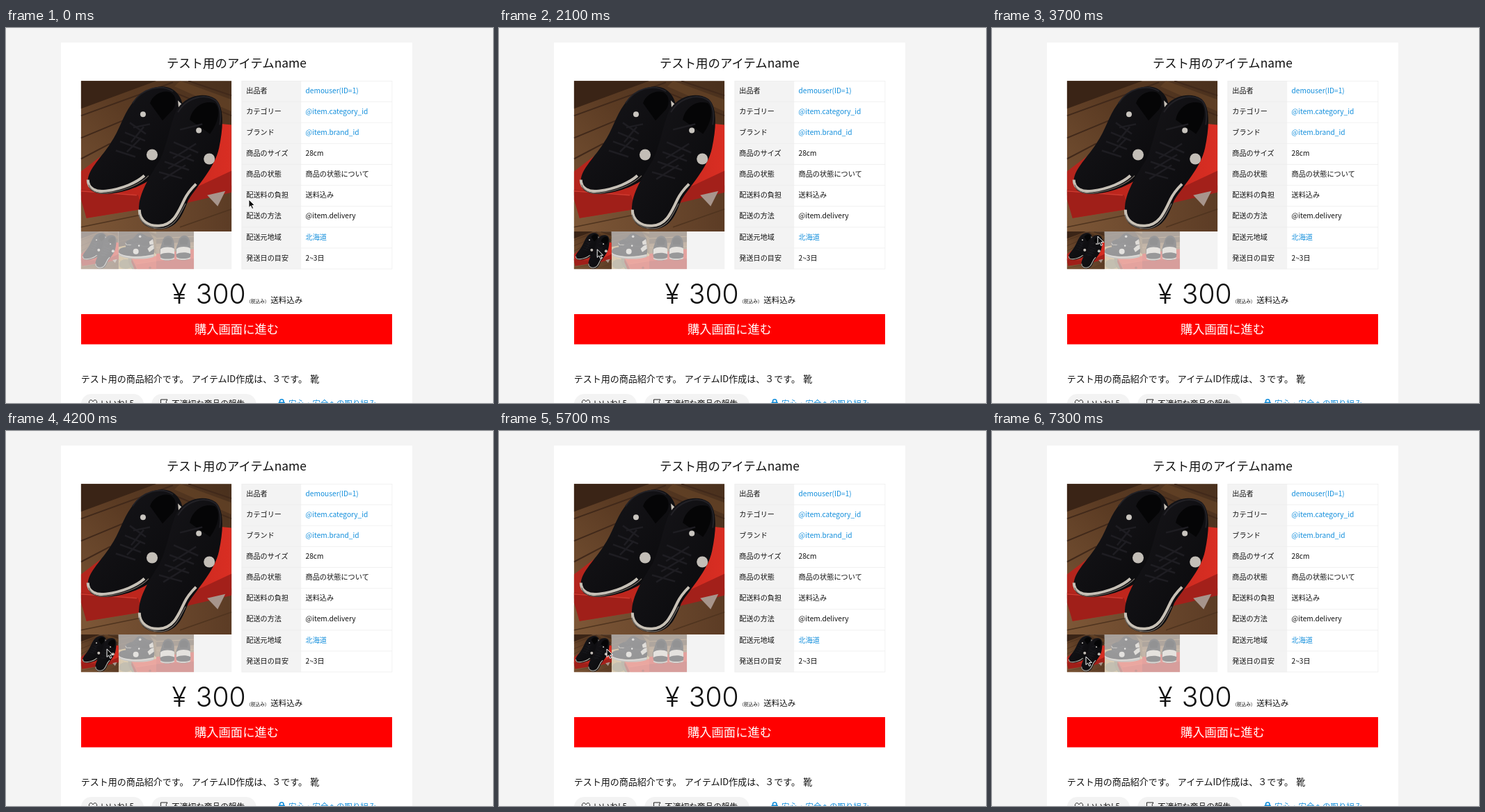
Recreate the animation shown at these times as an HTML page. Size 700 by 540 pixels, loop 7400 ms.

```html
<!DOCTYPE html>
<html lang="ja">
<head>
<meta charset="utf-8">
<title>商品ページ</title>
<style>
  html, body { margin: 0; width: 100%; height: 100%; overflow: hidden; background: #f4f4f4; }
  svg.stage { display: block; width: 700px; height: 540px; }
  text { font-family: "Noto Sans CJK JP", "Noto Sans CJK", sans-serif; fill: #111; }
  .link { fill: #148fdc; }
  .mid { text-anchor: middle; }
  .price { font: 300 39px Inter, sans-serif; }
</style>
</head>
<body>
<svg class="stage" viewBox="0 0 700 540" xmlns="http://www.w3.org/2000/svg">
  <defs>
    <linearGradient id="darkWood" x1="1" y1="0" x2="0" y2="1">
      <stop offset="0" stop-color="#49301d"/>
      <stop offset=".45" stop-color="#5b3b23"/>
      <stop offset="1" stop-color="#7d5737"/>
    </linearGradient>
    <linearGradient id="nearWood" x1="0" x2="1">
      <stop offset="0" stop-color="#7d5737"/>
      <stop offset="1" stop-color="#5c3c25"/>
    </linearGradient>
    <linearGradient id="boxRed" x1="0" x2="1">
      <stop offset="0" stop-color="#b3251d"/>
      <stop offset=".5" stop-color="#c2261c"/>
      <stop offset="1" stop-color="#d92e23"/>
    </linearGradient>
    <linearGradient id="floor" x1="0" y1="0" x2="1" y2="1">
      <stop offset="0" stop-color="#a98545"/>
      <stop offset="1" stop-color="#c3a368"/>
    </linearGradient>
    <linearGradient id="suede" x1="0" y1="0" x2="1" y2="1">
      <stop offset="0" stop-color="#17161a"/>
      <stop offset="1" stop-color="#09090b"/>
    </linearGradient>

    <!-- pair seen from above -->
    <symbol id="photo0" viewBox="108 76 216 216">
      <rect x="108" y="76" width="216" height="217" fill="url(#darkWood)"/>
      <path d="M108 76H216L108 116Z" fill="#3a2416"/>
      <path d="M108 126L240 78M108 158L180 128M240 92L324 126M262 76L324 97M108 188L150 166" stroke="#41291a" stroke-width="2" fill="none"/>
      <path d="M250 76L324 103V120L242 84Z" fill="#6a4728" opacity=".6"/>
      <path d="M108 250L196 255L324 226V293H108Z" fill="url(#nearWood)"/>
      <path d="M108 206L150 174L232 130L324 139V234L262 250L196 260L116 273L108 240Z" fill="url(#boxRed)"/>
      <path d="M108 232L190 240L196 260L116 273L108 246Z" fill="#a01f19"/>
      <path d="M108 234L188 240" stroke="#cf3a30" stroke-width="1.500"/>
      <path d="M324 205L266 232L256 252L324 236Z" fill="#a3201a"/>
      <path d="M108 286L196 268M250 286L324 260" stroke="#4f341f" stroke-width="1.500"/>
      <path d="M289 240L315 234L304 256Z" fill="#a7958c"/>

      <path d="M118 219C118 203 139 184 150 166C164 146 168 126 180 110C194 90 216 81 232 85C248 89 259 108 252 128L210 216C188 232 152 242 131 237C121 234 117 228 118 219Z" fill="url(#suede)"/>
      <path d="M118 218C118 231 130 236 144 234C168 231 188 222 199 212" fill="none" stroke="#c6c0b6" stroke-width="4"/>
      <path d="M119 225C122 237 138 239 152 236C172 233 194 224 205 212" fill="none" stroke="#716a62" stroke-width="1.3"/>
      <path d="M207 108C211 96 224 89 236 92C245 97 246 108 240 117L225 133Z" fill="#050506"/>
      <path d="M182 108C196 86 223 80 240 91" fill="none" stroke="#222126" stroke-width="2"/>
      <path d="M247 104L254 111L255 125L249 127Z" fill="#c8c2b9"/>
      <path d="M178 136L201 152M171 150L200 162M164 163L194 174M158 176L186 185M180 164L198 142M174 178L194 158M183 143L207 138" fill="none" stroke="#1e1d22" stroke-width="2.500"/>

      <path d="M191 262C190 237 209 210 221 190C232 168 235 140 245 118C258 97 284 91 301 102C314 113 312 144 306 172C300 201 275 226 262 247C252 272 246 287 222 289C201 289 190 278 191 262Z" fill="url(#suede)"/>
      <path d="M192 261C191 276 205 285 220 284C240 283 247 266 256 247C260 238 266 231 273 224" fill="none" stroke="#c8c1b6" stroke-width="4"/>
      <path d="M191 268C195 285 214 290 228 287C244 283 250 267 258 252" fill="none" stroke="#706962" stroke-width="1.3"/>
      <path d="M264 132C267 114 284 103 300 108C309 116 305 136 293 152Z" fill="#050506"/>
      <path d="M247 121C260 99 287 93 302 105C308 112 309 126 307 139" fill="none" stroke="#222126" stroke-width="2"/>
      <path d="M241 164L276 179M235 178L270 191M228 192L263 204M220 207L253 216M240 187L273 166M233 202L266 182M226 217L258 197M250 146L282 138" fill="none" stroke="#1e1d22" stroke-width="2.500"/>
      <circle cx="210" cy="182" r="8" fill="#c3beb7"/>
      <circle cx="292" cy="188" r="8" fill="#c3beb7"/>
      <circle cx="197" cy="124" r="4" fill="#c9c5bf"/>
      <circle cx="277" cy="147" r="4" fill="#c9c5bf"/>
    </symbol>

    <!-- pair seen from the side -->
    <symbol id="photo1" viewBox="108 76 216 216">
      <rect x="108" y="76" width="216" height="217" fill="url(#floor)"/>
      <path d="M108 76H324V124L108 164Z" fill="#38271a"/>
      <path d="M108 104L230 82M108 136L170 119" stroke="#503621" stroke-width="2"/>
      <path d="M282 76H324V206L308 193V115Z" fill="#6b4d2d"/>
      <path d="M282 76L324 91V109L291 91Z" fill="#493019"/>
      <path d="M108 236L180 293M108 272L133 293M132 231L208 290M309 135L324 143M309 176L324 185" stroke="#806437" stroke-width="1.3"/>
      <ellipse cx="149" cy="263" rx="38" ry="28" fill="#7f7351"/>
      <path d="M163 222L215 230L210 293H187C169 274 160 248 163 222Z" fill="#75684c"/>
      <path d="M181 231L324 216V249L210 264Z" fill="#df3725"/>
      <path d="M185 233L210 264L324 244V293H215Z" fill="#d82f20"/>
      <path d="M210 263L324 245V293H215Z" fill="#cf2d20"/>
      <path d="M210 263L324 245" stroke="#ef5540" stroke-width="1.5"/>
      <path d="M183 232L214 293H199L181 250Z" fill="#961d17"/>
      <circle cx="288" cy="284" r="7" fill="#912019"/>

      <path d="M147 143C149 126 172 123 190 115C203 108 210 91 222 86C236 82 249 91 266 102C281 111 298 106 306 118L309 149L286 181H151Z" fill="url(#suede)"/>
      <path d="M147 141L153 151L196 153" fill="none" stroke="#aaa59a" stroke-width="4"/>
      <path d="M218 91C236 88 246 108 270 113C286 115 298 108 304 115" fill="none" stroke="#242228" stroke-width="2"/>
      <path d="M283 134L304 119L309 148L288 156Z" fill="#c5beb3"/>
      <path d="M178 119L201 132M186 115L210 127M194 110L216 118M200 103L222 111" stroke="#1e1d22" stroke-width="2.500"/>
      <circle cx="231" cy="105" r="7" fill="#bfbcb7"/>

      <path d="M109 192C107 174 125 167 147 165C170 162 183 148 199 142C213 135 231 142 242 152C258 160 281 151 302 150C314 158 315 178 310 208L309 218L189 219C151 218 118 212 109 198Z" fill="url(#suede)"/>
      <path d="M108 194C113 207 143 214 179 218C229 223 272 214 311 206L309 222C273 235 221 235 178 231C141 226 115 220 108 207Z" fill="#a7a39b"/>
      <path d="M109 200C131 216 164 222 204 223C245 224 281 216 310 210" fill="none" stroke="#cbc6bd" stroke-width="2.5"/>
      <path d="M109 208C132 223 166 230 207 231C251 231 286 225 309 220" fill="none" stroke="#696760" stroke-width="2"/>
      <path d="M274 174L295 155L309 151L311 174L284 194Z" fill="#c6c0b7"/>
      <path d="M206 144C224 141 239 164 259 163C277 163 290 153 304 152" fill="none" stroke="#242329" stroke-width="2"/>
      <path d="M155 164L186 182M168 160L200 177M180 153L209 169M190 146L216 158M165 180L204 151M153 174L187 153" stroke="#1e1d22" stroke-width="2.500"/>
      <circle cx="207" cy="190" r="16" fill="#d0cbc3"/>
      <circle cx="225" cy="157" r="5" fill="#d7d4ce"/>
    </symbol>

    <!-- pair seen from behind -->
    <symbol id="photo2" viewBox="0 0 216 216">
      <rect width="216" height="216" fill="#7c5a39"/>
      <path d="M0 0H216V60L0 70Z" fill="#4c3420"/>
      <path d="M0 40L216 28M0 92L216 85" stroke="#9b774b" stroke-width="3"/>
      <path d="M0 128L216 100V216H0Z" fill="#cf2b20"/>
      <path d="M0 170L216 154V216H0Z" fill="#ae211b"/>
      <g id="heel">
        <path d="M22 130C17 94 32 76 37 50C48 19 84 17 96 43C108 65 99 96 105 131C105 160 88 167 62 166C36 167 22 156 22 130Z" fill="#111115"/>
        <path d="M42 56C47 30 82 28 91 52L86 77H46Z" fill="#030305"/>
        <path d="M24 102C38 86 84 86 103 98L104 130C80 120 47 120 23 132Z" fill="#d1cac0"/>
        <path d="M23 150C45 160 80 160 104 150V157C78 168 43 168 24 157Z" fill="#b3aca2"/>
      </g>
      <use href="#heel" x="92" y="-2"/>
    </symbol>
  </defs>

  <rect width="700" height="540" fill="#f4f4f4"/>
  <rect x="79" y="21" width="505" height="519" fill="#fff"/>
  <text class="mid" x="331.4" y="57.2" font-size="17.4">テスト用のアイテムname</text>

  <use id="main" href="#photo0" x="107.7" y="76" width="216.6" height="217"/>
  <rect x="107.7" y="293" width="216.6" height="54.3" fill="#f3f3f3"/>
  <g id="thumbs"></g>
  <g id="table"></g>

  <text class="price mid" x="249" y="397.3">¥</text>
  <text class="price" x="272.8" y="397.3">300</text>
  <text x="345.5" y="395.5" font-size="6.6">（税込み）</text>
  <text x="380.3" y="395.5" font-size="11.5">送料込み</text>

  <rect x="108" y="412" width="447" height="43.5" fill="#f00"/>
  <text class="mid" x="331.5" y="440.2" font-size="17.3" style="fill:#fff">購入画面に進む</text>
  <text x="107.7" y="510.3" font-size="13" word-spacing="1.5">テスト用の商品紹介です。 アイテムID作成は、３です。 靴</text>

  <rect x="107.7" y="527" width="90.5" height="30" rx="15" fill="#f3f3f3"/>
  <rect x="209" y="527" width="151" height="30" rx="15" fill="#f3f3f3"/>
  <g fill="none" stroke="#222" stroke-width="1">
    <path d="M125 547L120.5 542C117 537 122.5 533 125 538C127.5 533 133 537 129.5 542Z"/>
    <path d="M222.5 547V535H232L230 538.5L232 542H223"/>
  </g>
  <text x="136" y="545.3" font-size="11.7">いいね! 5</text>
  <text x="238" y="545.3" font-size="11.7">不適切な商品の報告</text>
  <path d="M393.5 540V537.5A2.7 2.7 0 0 1 399 537.5V540" fill="none" stroke="#148fdc" stroke-width="1.7"/>
  <rect x="391.5" y="538.5" width="9.5" height="8" rx="1" fill="#148fdc"/>
  <text class="link" x="406" y="545.3" font-size="11.5">安心・安全への取り組み</text>

  <path id="cursor" d="M0 0V11.6L2.7 9.1L4.7 13.5L6.7 12.6L4.8 8.4H8.5Z" fill="#080808" stroke="#fff" stroke-width="1"/>
</svg>
<script>
const NS = "http://www.w3.org/2000/svg";
const byId = id => document.getElementById(id);

function add(parent, tag, attrs, label) {
  const node = document.createElementNS(NS, tag);
  for (const key in attrs) node.setAttribute(key, attrs[key]);
  if (label) node.textContent = label;
  parent.append(node);
  return node;
}

const rows = [
  ["出品者", "demouser(ID=1)", 1],
  ["カテゴリー", "@item.category_id", 1],
  ["ブランド", "@item.brand_id", 1],
  ["商品のサイズ", "28cm"],
  ["商品の状態", "商品の状態について"],
  ["配送料の負担", "送料込み"],
  ["配送の方法", "@item.delivery"],
  ["配送元地域", "北海道", 1],
  ["発送日の目安", "2~3日"]
];
const rowHeight = 30.12;
const table = byId("table");
add(table, "rect", { x: 338.7, y: 76, width: 85.5, height: 271.3, fill: "#f3f3f3" });
add(table, "rect", { x: 338.9, y: 76.4, width: 216, height: 270.6, fill: "none", stroke: "#eee", "stroke-width": .8 });
rows.forEach(([label, value, isLink], i) => {
  const top = 76 + i * rowHeight;
  if (i) add(table, "path", { d: `M339 ${top}H555`, stroke: "#eee", "stroke-width": .8 });
  add(table, "text", { x: 345.3, y: top + 17.7, "font-size": 10.15 }, label);
  add(table, "text", { x: 430.5, y: top + 17.7, "font-size": 10.2, class: isLink ? "link" : "" }, value);
});

const thumbSize = 54.15, left = 107.7, thumbTop = 293;
const thumbs = [0, 1, 2].map(i => add(byId("thumbs"), "use", {
  href: "#photo" + i, x: left + i * thumbSize, y: thumbTop, width: thumbSize, height: thumbSize + .2
}));

// Pointer path: time, x, y
const path = [
  [0, 349, 247], [300, 343, 246], [1000, 165, 200], [1300, 152, 192],
  [1700, 140, 290], [2000, 136, 318], [2300, 156, 321], [2800, 213, 317],
  [3050, 238, 315], [3350, 200, 308], [3700, 152, 300], [4100, 140, 314],
  [4700, 208, 312.5], [4950, 238, 314], [5300, 200, 317], [5700, 155, 314],
  [6000, 180, 315], [6350, 238, 318], [6700, 195, 319], [7000, 150, 322], [7300, 135, 325]
];
const DURATION = 7400, STEP = 100;

function pointerAt(time) {
  const next = path.findIndex(p => p[0] >= time);
  if (next < 1) return path[0].slice(1);
  const [t0, x0, y0] = path[next - 1], [t1, x1, y1] = path[next];
  const k = (time - t0) / (t1 - t0), ease = k * k * (3 - 2 * k);
  return [x0 + (x1 - x0) * ease, y0 + (y1 - y0) * ease];
}

function draw(time) {
  const [x, y] = pointerAt(Math.floor(time / STEP) * STEP);
  const hovered = y >= thumbTop ? Math.floor((x - left) / thumbSize) : -1;
  byId("cursor").setAttribute("transform", `translate(${x} ${y})`);
  byId("main").setAttribute("href", "#photo" + Math.max(0, hovered));
  thumbs.forEach((thumb, i) => thumb.setAttribute("opacity", i === hovered ? 1 : .4));
}

const start = performance.now();
function tick() {
  draw((performance.now() - start) % DURATION);
  requestAnimationFrame(tick);
}
tick();
</script>
</body>
</html>
```
